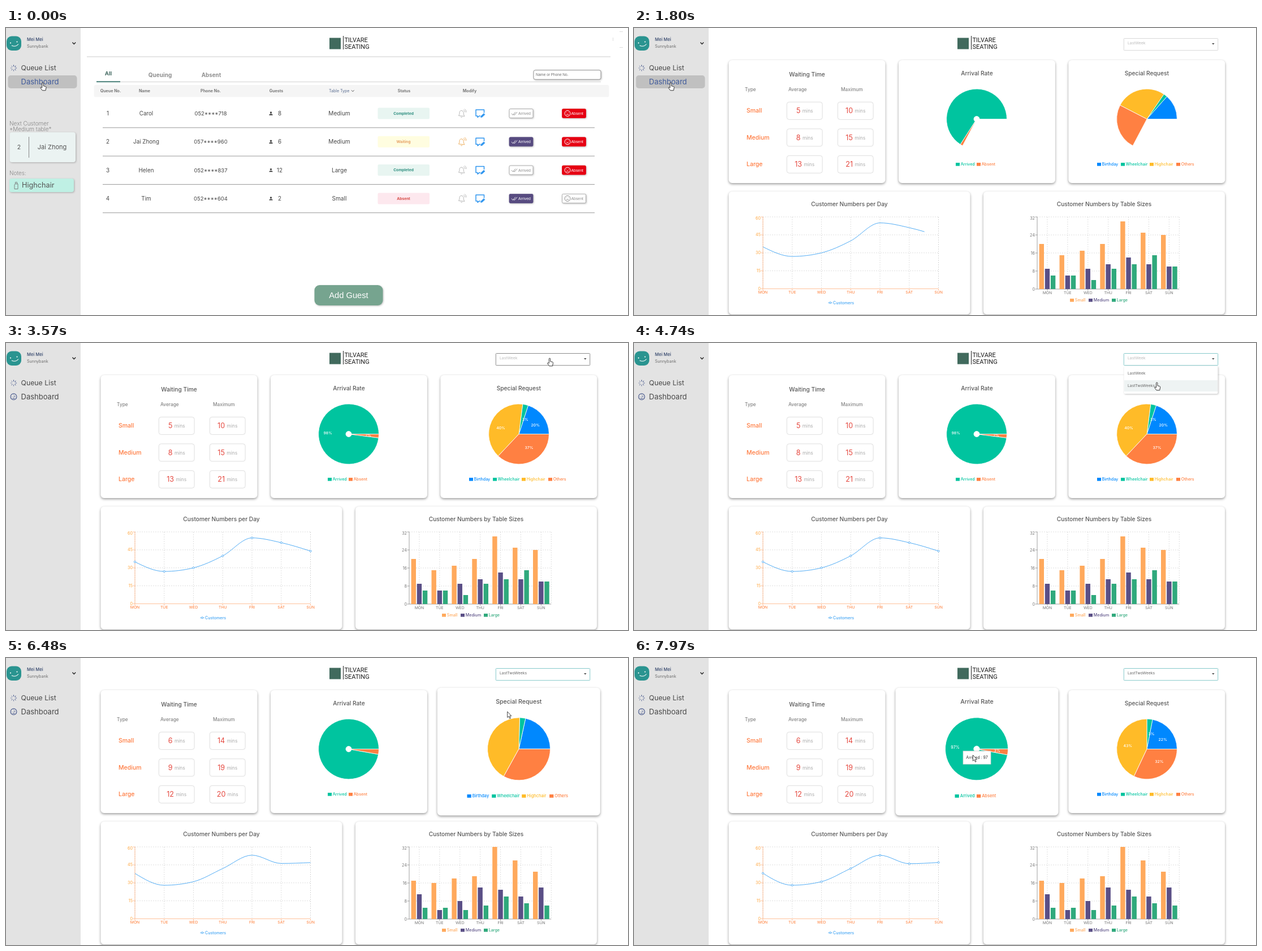
These frames come from a looping animation (1100 px wide and 509 px high, 8000 ms). An HTML page:

```html
<!DOCTYPE html>
<html lang="en">
<head>
<meta charset="utf-8">
<title>Queue dashboard</title>
<style>
  html, body { margin: 0; width: 100%; height: 100%; overflow: hidden; background: #fff; }
  svg { display: block; width: 100vw; height: 100vh; font-family: Inter, "Open Sans", sans-serif; }
  .card { fill: #fff; filter: drop-shadow(0 2.5px 2.2px rgba(0,0,0,.36)) drop-shadow(0 0 1px rgba(0,0,0,.06)); }
  .soft { filter: drop-shadow(1px 1.5px 1.5px rgba(0,0,0,.25)); }
  .mid { text-anchor: middle; }
  .end { text-anchor: end; }
  .m { font-weight: 500; }
  .b { font-weight: 700; }
  .arial { font-family: "Liberation Sans", Arial, sans-serif; }
  .grid { stroke: #d2d2d2; stroke-width: .7; stroke-dasharray: 2 2; fill: none; }
</style>
</head>
<body>
<svg id="stage" viewBox="0 0 1100 509" preserveAspectRatio="none"></svg>
<script>
const LOOP = 8000, MOUNT = 811, SWITCH = 5340;
const DAYS = ['MON', 'TUE', 'WED', 'THU', 'FRI', 'SAT', 'SUN'];
const TEAL = '#00c49f', ORANGE = '#ff8042', YELLOW = '#ffbb28', BLUE = '#0088fe';

const weeks = [
  { wait: [[5, 10], [8, 15], [13, 21]],
    line: [35, 27, 30, 40, 55, 51, 44],
    bars: [[20, 15, 17, 20, 30, 25, 24], [9, 6, 9, 11, 14, 11, 10], [6, 6, 4, 9, 11, 15, 10]],
    arrival: [98, 2], special: [20, 3, 40, 37] },
  { wait: [[6, 14], [9, 19], [12, 20]],
    line: [38, 28, 31, 42, 53, 46, 47],
    bars: [[17, 16, 18, 19, 32, 26, 21], [11, 4, 8, 14, 13, 10, 14], [5, 5, 4, 6, 10, 7, 6]],
    arrival: [97, 3], special: [22, 3, 43, 32] }
];

// Pointer stops: time, x, y
const pointer = [
  [0, 65, 97], [2620, 65, 97], [2730, 84, 113], [2870, 150, 135], [3010, 400, 150],
  [3140, 600, 110], [3250, 730, 55], [3400, 900, 32], [3540, 961.5, 27], [4200, 961.5, 27],
  [4700, 925, 70], [5090, 922, 70], [5400, 911, 66], [6200, 907, 76], [6850, 860, 120],
  [7090, 672, 151], [7300, 655, 160], [7700, 602, 172], [8000, 599, 172]
];

/* ---------- helpers ---------- */
const clamp = v => Math.max(0, Math.min(1, v));
const lerp = (a, b, p) => a + (b - a) * p;
const mix = (a, b, p) => a.map((v, i) => lerp(v, b[i], p));
const r2 = v => Math.round(v * 100) / 100;

function bezier(x1, y1, x2, y2) {
  const at = (a, b, u) => 3 * a * u * (1 - u) ** 2 + 3 * b * u * u * (1 - u) + u ** 3;
  return p => {
    p = clamp(p);
    let lo = 0, hi = 1;
    for (let i = 0; i < 22; i++) {
      const u = (lo + hi) / 2;
      if (at(x1, x2, u) < p) lo = u; else hi = u;
    }
    return p === 0 || p === 1 ? p : at(y1, y2, lo);
  };
}
const ease = bezier(.25, .1, .25, 1), easeOut = bezier(0, 0, .58, 1);
const run = (t, start, length) => ease((t - start) / length);

const text = (x, y, s, size, fill, cls = '', more = '') =>
  `<text x="${r2(x)}" y="${r2(y)}" font-size="${size}" fill="${fill}" class="${cls}" ${more}>${s}</text>`;
const rect = (x, y, w, h, fill, rx = 0, more = '') =>
  `<rect x="${r2(x)}" y="${r2(y)}" width="${r2(w)}" height="${r2(h)}" rx="${rx}" fill="${fill}" ${more}/>`;
const path = (d, stroke, w = 1, fill = 'none', more = '') =>
  `<path d="${d}" stroke="${stroke}" stroke-width="${w}" fill="${fill}" stroke-linejoin="round" ${more}/>`;
const group = (id, body, more = '') => `<g id="${id}" ${more}>${body}</g>`;
const at = (x, y, body) => `<g transform="translate(${x} ${y})">${body}</g>`;

/* ---------- sidebar and header ---------- */
function sidebar() {
  const rays = [...Array(8).keys()].map(i =>
    `<path d="M0-2.8V-5.6" transform="rotate(${i * 45})" stroke="#44558a" stroke-width="1.1" opacity="${1 - i * .07}"/>`).join('');
  return rect(0, 0, 132, 509, '#e3e3e3') +
    rect(1, 14.5, 26, 25.5, '#2a9490', 9) +
    '<circle cx="8" cy="26.5" r="1.1" fill="#fff"/><circle cx="19.5" cy="24.5" r="1.1" fill="#fff"/>' +
    path('M10 31Q17 34.5 22 28.5', '#fff', 1.1) +
    text(37, 23, 'Mei Mei', 7.6, '#33456b', 'm') +
    text(37, 35.3, 'Sunnybank', 7.1, '#6c6c6c') +
    path('M117.5 25.5L120.3 28.6L123.1 25.5', '#222', 1.4) +
    at(13.5, 71, rays) +
    text(26.5, 75.3, 'Queue List', 12.3, '#484848') +
    group('active', rect(3.5, 84, 122, 23, '#c0c0c0', 5)) +
    group('gauge', at(13.5, 95.3, '<circle r="5.4" fill="none" stroke="#44558a" stroke-width="1.1"/>' +
      path('M0 1L2.2-2M-3.3 0H-2.6M3.3 0H2.6M0-3.4V-2.8M-2 3H2', '#44558a', 1))) +
    text(26.5, 99.6, 'Dashboard', 13, '#484848', '', 'id="dash"');
}

const logo = rect(572, 17.5, 20, 20, '#416a5d') + path('M596.5 14V38', '#222', 1) +
  ['TILVARE', 'SEATING'].map((s, i) =>
    text(598.5, 25.4 + i * 11.2, s, 11, '#1c1c1c', '', 'font-family="Roboto, sans-serif"')).join('');

/* ---------- queue page ---------- */
function tableRow([no, name, phone, guests, size, status], i) {
  const y = 151.5 + i * 50.3;
  const [bg, fg] = { Completed: ['#e8f5f1', '#2f8f80'], Waiting: ['#fffde0', '#e6a063'], Absent: ['#fde8ee', '#d64a45'] }[status];
  const bell = status === 'Waiting' ? '#eeb164' : '#b9b9b9';
  const cell = (x, s, size = 9.8) => text(x, y + 3.5, s, size, '#484848', 'mid');
  const button = (x, label, on, color, icon) => {
    const ink = on ? '#fff' : '#8d8d8d';
    return rect(x, y - 8, 42, 16, on ? color : '#fff', 2, `class="soft" stroke="${on ? color : '#999'}" stroke-width=".8"`) +
      at(x, y, icon(ink)) + text(x + 16, y + 2.4, label, 6.9, ink, 'arial');
  };
  const checks = c => path('M4 0L6.5 3L11-2.5M7.5 1.2L9.2 3L14-2.5', c, .9);
  const sad = c => `<circle cx="9.5" r="5" fill="none" stroke="${c}" stroke-width="1"/>` +
    path('M7 2.6Q9.5-.2 12 2.6M7.4-2V-1M11.6-2V-1', c, .9);
  return cell(180, no) + cell(248, name) + cell(362, phone, 9.5) +
    at(468.5, y, '<circle cy="-1.5" r="1.7" fill="#444"/><path d="M-3.2 3.2Q-3 .8 0 .8T3.2 3.2z" fill="#444"/>') +
    cell(484, guests) + cell(589.5, size, 10.1) +
    rect(657.5, y - 10, 91.5, 20, bg, 2) + text(703, y + 2.3, status, 6.7, fg, 'mid b') +
    at(806, y, path('M-5.5 4Q-3.5 1-4-1.5Q-3.5-5.5 0-5Q3.5-4.5 3.2-.5Q3.2 3 5 5zM-2 6Q-.5 8 1.2 6M3-6.5Q5.5-5 5.8-2M5-8Q8-6 8.2-2', bell, 1)) +
    at(838, y, path('M1 4.5H-1L-4 7V4.5H-7V-6.5H7.5V-1', '#3096ef', 1.5) +
      path('M1.5 7L2 4.5L7 0L9 2L4 6.7z', '#3096ef', .6, '#3096ef')) +
    button(890, 'Arrived', status === 'Waiting' || status === 'Absent', '#574b80', checks) +
    button(983.5, 'Absent', status !== 'Absent', '#e60012', sad) +
    path(`M171 ${r2(y + 25.3)}H1041`, '#999', 1);
}

function queuePage() {
  const heads = [[185, 'Queue No.'], [245, 'Name'], [362, 'Phone No.'], [478, 'Guests'], [704, 'Status'], [820, 'Modify']];
  const rows = [
    [1, 'Carol', '052****718', 8, 'Medium', 'Completed'],
    [2, 'Jai Zhong', '057****960', 6, 'Medium', 'Waiting'],
    [3, 'Helen', '052****837', 12, 'Large', 'Completed'],
    [4, 'Tim', '052****604', 2, 'Small', 'Absent']];
  return text(6, 173, 'Next Customer', 10, '#858585', '', 'font-weight="300"') +
    text(6, 183, '*Medium table*', 10, '#858585', '', 'font-weight="300"') +
    rect(6.5, 185, 116.5, 53, '#ebf3f2', 4, 'class="soft"') +
    text(23, 215.3, 2, 10.5, '#555', 'mid') + path('M40.5 193V230', '#888', 1) +
    text(81.5, 215.3, 'Jai Zhong', 11, '#555', 'mid') +
    text(6, 260.5, 'Notes:', 9.8, '#858585', '', 'font-weight="300"') +
    rect(6, 267, 114, 24, '#bff0e4', 4, 'class="soft"') +
    path('M16 276.5H21V285.5H15V278zM16.5 276V273.5H19.5V276', '#777', .9) +
    text(28, 283.3, 'Highchair', 12.7, '#555') +
    path('M143 51H1069', '#e5e5e5', 2) +
    path('M1073.5 17V23M1085 6.5H1091M1085 34.5H1091', '#ddd', 1) +
    path('M202 95.5H1052', '#e5e5e5', 2) + path('M160 95.2H202', '#477f78', 2) +
    text(181, 84.3, 'All', 9.6, '#456b63', 'mid b') +
    text(272.5, 86.8, 'Queuing', 10, '#8f8f8f', 'mid b') + text(363, 86.8, 'Absent', 9.8, '#8f8f8f', 'mid b') +
    rect(933, 74.8, 119, 16.4, '#fff', 3, 'stroke="#888" stroke-width=".9" class="soft"') +
    text(937, 85.3, 'Name or Phone No.', 6.5, '#6f6f6f', 'arial') +
    rect(155.5, 101, 911, 21.5, '#f5f5f5', 3) +
    heads.map(([x, s]) => text(x, 114, s, 7.1, '#777', 'mid b')).join('') +
    text(571, 114, 'Table Type', 7, '#596c90') + path('M611 110.3L613.3 112.8L615.6 110.3', '#555', 1) +
    rows.map(tableRow).join('') +
    rect(545.5, 456, 121, 36, '#76a48f', 9, 'class="soft"') +
    text(606, 479, 'Add Guest', 14.7, '#fff', 'mid arial');
}

/* ---------- dashboard ---------- */
const panel = (x, y, w, title, ty) => rect(x, y, w, 218, '#fff', 6, 'class="card"') +
  text(x + w / 2, ty, title, 10.2, '#575757', 'mid m');
const legend = (y, items) => items.map(([x, s, c]) => rect(x, y - 5, 7, 5.6, c) +
  text(x + 8.8, y + .3, s, 7.1, c, 'm')).join('');

function waitingCard() {
  const heads = [[196, 'Type'], [273, 'Average'], [366, 'Maximum']];
  return panel(167.5, 57, 277, 'Waiting Time', 85.8) +
    heads.map(([x, s]) => text(x, 112, s, 8.3, '#858585', 'm')).join('') +
    ['Small', 'Medium', 'Large'].map((s, i) => {
      const y = 131.3 + i * 47.5;
      return text(199, y + 18.7, s, 10.5, '#ff7a3f', 'm') + [270.3, 360.3].map((x, k) =>
        rect(x, y, 62.8, 31, '#fff', 4, 'stroke="#dedede" stroke-width="1"') +
        `<text x="${x + 31.4}" y="${y + 19.8}" class="mid" font-size="12.6" fill="#e5483f">` +
        `<tspan id="wait${i}${k}"></tspan><tspan dx="3.4" dy="-.8" font-size="8.4" fill="#aaa">mins</tspan></text>`).join('');
    }).join('');
}

const arrivalCard = () => panel(468, 57, 277, 'Arrival Rate', 84) + group('arrivalPie', '') +
  legend(244, [[569, 'Arrived', TEAL], [606, 'Absent', ORANGE]]);
const specialCard = () => panel(768.3, 57, 277, 'Special Request', 84) + group('specialPie', '') +
  legend(244, [[819, 'Birthday', BLUE], [861, 'Wheelchair', TEAL], [912, 'Highchair', YELLOW], [959, 'Others', ORANGE]]);

const LX = 228, LSTEP = 51.75, BX = 713, BAND = 35.9;
const lineY = v => 462.5 - v * 2.125, barY = v => 463 - v * 4;

function axes(x, w, bottom, top, step, xs, yInk, xInk, axis, ty) {
  const rows = [0, 1, 2, 3, 4].map(i => bottom - i * (bottom - top) / 4);
  return path(rows.slice(1).map(y => `M${x} ${y}h${w}`).join('') +
      [...xs, x + w].map(v => `M${r2(v)} ${top}V${bottom}`).join(''), '#d2d2d2', .7, 'none', 'class="grid"') +
    path(`M${x} ${top}V${bottom}H${x + w}` + rows.map(y => `M${x - 3.5} ${y}h3.5`).join('') +
      xs.map(v => `M${r2(v)} ${bottom}v3`).join(''), axis, .8) +
    rows.map((y, i) => text(x - 4, y + (i === 4 ? 5 : 2.6), i * step, 7.2, yInk, 'end')).join('') +
    xs.map((v, i) => text(v, ty, DAYS[i], 6.8, xInk, 'mid')).join('');
}

const lineCard = () => panel(167.5, 290, 427, 'Customer Numbers per Day', 316.3) +
  axes(LX, LSTEP * 6, 462.5, 335, 15, DAYS.map((_, i) => LX + i * LSTEP), '#ffa63f', '#ff7b33', '#ffb182', 471.2) +
  group('line', '') + path('M343.5 487.3H350.5', '#3fa3f3', .9) +
  '<circle cx="347" cy="487.3" r="1.5" fill="#fff" stroke="#3fa3f3" stroke-width=".9"/>' +
  text(352, 489.7, 'Customers', 7.1, '#3fa3f3', 'm');

const BAR_INK = ['#ffa95c', '#5a4f86', '#2fa97c'];
const barCard = () => panel(618, 290, 427, 'Customer Numbers by Table Sizes', 316.3) +
  axes(BX, BAND * 7, 463, 335, 8, DAYS.map((_, i) => BX + (i + .5) * BAND), '#777', '#777', '#888', 472) +
  group('bars', '') +
  legend(485, [[771, 'Small', BAR_INK[0]], [804, 'Medium', BAR_INK[1]], [845, 'Large', BAR_INK[2]]]);

function pie(cx, cy, inner, values, inks, sweep, labels) {
  const R = 53.4, point = (r, a) => [r2(cx + r * Math.cos(a)), r2(cy - r * Math.sin(a))];
  let a = 0, shapes = '', notes = '';
  values.forEach((v, i) => {
    const b = a + v / 100 * sweep * 2 * Math.PI, big = +(b - a > Math.PI);
    if (b > a) shapes += path(`M${point(inner, a)}L${point(R, a)}A${R} ${R} 0 ${big} 0 ${point(R, b)}` +
      `L${point(inner, b)}A${inner} ${inner} 0 ${big} 1 ${point(inner, a)}z`, '#fff', .8, inks[i]);
    const [x, y] = point((R + inner) / 2, (a + b) / 2);
    if (labels) notes += text(x, y + 2.4, Math.round(v) + '%', 6.8, '#fff', x > cx ? 'm' : 'm end');
    a = b;
  });
  return shapes + notes;
}

// Monotone cubic through evenly spaced points
function curve(ys) {
  const d = ys.slice(1).map((y, i) => y - ys[i]);
  const m = ys.map((_, i) => {
    const p = d[i - 1], q = d[i];
    return (Math.sign(p) + Math.sign(q)) * Math.min(Math.abs(p), Math.abs(q), Math.abs(p + q) / 4);
  });
  m[0] = (3 * d[0] - m[1]) / 2;
  m[6] = (3 * d[5] - m[5]) / 2;
  return `M${LX} ${r2(ys[0])}` + d.map((_, i) => {
    const x = LX + i * LSTEP, h = LSTEP / 3;
    return `C${[x + h, ys[i] + m[i] / 3, x + 2 * h, ys[i + 1] - m[i + 1] / 3, x + LSTEP, ys[i + 1]].map(r2)}`;
  }).join('');
}

/* ---------- build ---------- */
const stage = document.getElementById('stage');
const option = (y, s, id) => rect(867, y, 165, 20, '#fff', 0, `id="${id}"`) + text(873, y + 12.4, s, 6.8, '#666');
stage.innerHTML = '<clipPath id="main"><rect x="132" width="948" height="509"/></clipPath>' +
  sidebar() + logo + group('queue', queuePage()) +
  group('clip', group('dashboard', group('waiting', waitingCard()) + group('arrival', arrivalCard()) +
    group('special', specialCard()) + lineCard() + barCard()), 'clip-path="url(#main)"') +
  group('select', rect(866.3, 18.5, 166.4, 21.2, '#fff', 1, 'id="box"') +
    text(873, 29.4, '', 6.8, '#bbb', '', 'id="choice"') + '<path d="M1022 27h4.6l-2.3 2.4z" fill="#444"/>') +
  group('menu', rect(866.5, 41, 166, 49, '#fff', 2, 'class="soft"') + option(44, 'LastWeek', 'opt0') + option(66, 'LastTwoWeeks', 'opt1')) +
  group('tip', rect(582, 165, 49, 23.3, '#fff', 0, 'stroke="#ccc" stroke-width=".8"') +
    text(606.5, 179, 'Arrived : 97', 7, '#333', 'mid')) +
  group('pointer', path('M-1.2 9V1.2a1.2 1.2 0 0 1 2.4 0V5.8l3.4.7q1.6.4 1.4 2L5 13.8H-.6L-3.8 9.6q-.6-1.6 1-1.4z', '#222', .9, '#fff', 'id="hand"') +
    path('M0 0V10.5L2.4 8.4L4.2 12.4L5.8 11.7L4.1 7.8H7.2z', '#333', .9, '#fff', 'id="arrow"'));

const el = {};
stage.querySelectorAll('[id]').forEach(n => el[n.id] = n);
const show = (n, on) => n.setAttribute('display', on ? 'inline' : 'none');
const last = {};
function fill(id, html) {
  if (last[id] !== html) el[id].innerHTML = last[id] = html;
}

// Card centre, then alternating enter and leave times
const hovers = { waiting: [306, 2880, 3020], arrival: [606.5, 3020, 3250, 7090, 9999], special: [906.8, 5100, 6990] };
function lift(id, t) {
  const [cx, ...spans] = hovers[id];
  const level = spans.reduce((sum, at, i) => sum + run(t, at, 300) * (i % 2 ? -1 : 1), 0);
  el[id].setAttribute('transform', `translate(${cx} 166) scale(${1 + .04 * level}) translate(${-cx} -166)`);
}

function movePointer(t) {
  const i = Math.max(0, pointer.findIndex(k => k[0] > t) - 1);
  const [a, b] = [pointer[i], pointer[i + 1]], p = (t - a[0]) / (b[0] - a[0]);
  el.pointer.setAttribute('transform', `translate(${r2(lerp(a[1], b[1], p))} ${r2(lerp(a[2], b[2], p))})`);
  const hand = t < 2680 || (t > 3400 && t < 5100);
  show(el.hand, hand);
  show(el.arrow, !hand);
}

function charts(t) {
  const [a, b] = weeks, now = t < SWITCH ? a : b;
  now.wait.forEach((pair, i) => pair.forEach((v, k) => fill(`wait${i}${k}`, String(v))));

  const ys = mix(a.line, b.line, run(t, SWITCH, 1500)).map(lineY);
  const drawn = run(t, MOUNT, 1500);
  const dots = (t >= MOUNT + 1500 && t < SWITCH) || t >= SWITCH + 1500;
  fill('line', path(curve(ys), '#3fa3f3', .9, 'none', drawn < 1 ? `pathLength="1" stroke-dasharray="${drawn} 2"` : '') +
    (dots ? ys.map((y, i) => `<circle cx="${LX + i * LSTEP}" cy="${r2(y)}" r="1.6" fill="#fff" stroke="#3fa3f3" stroke-width=".8"/>`).join('') : ''));

  const grow = run(t, MOUNT, 400), change = run(t, SWITCH, 400);
  fill('bars', BAR_INK.map((ink, k) => mix(a.bars[k], b.bars[k], change).map((v, i) =>
    rect(BX + i * BAND + 3.6 + k * 10.15, barY(v * grow), 8.4, v * grow * 4, ink)).join('')).join(''));

  const sweep = run(t, MOUNT + 400, 1500), turn = run(t, SWITCH + 400, 1500);
  const labels = (sweep === 1 && t < SWITCH) || turn === 1;
  fill('arrivalPie', pie(606, 161.5, 5, mix(a.arrival, b.arrival, turn), [TEAL, ORANGE], sweep, labels));
  fill('specialPie', pie(907, 161.5, 0, mix(a.special, b.special, turn), [BLUE, TEAL, YELLOW, ORANGE], sweep, labels));
}

function draw(t) {
  const over = t < 2680;
  show(el.active, over);
  show(el.gauge, !over);
  el.dash.setAttribute('fill', over ? '#3f5a9b' : '#484848');

  show(el.queue, t < MOUNT);
  el.queue.setAttribute('opacity', 1 - clamp((t - 520) / 240));

  show(el.clip, t >= MOUNT);
  show(el.select, t >= MOUNT);
  const slide = easeOut((t - MOUNT) / 720);
  el.dashboard.setAttribute('transform', `translate(${r2(948 * (1 - slide))} 0)`);
  el.dashboard.setAttribute('opacity', r2(slide));

  const chosen = t >= 5090;
  fill('choice', chosen ? 'LastTwoWeeks' : 'LastWeek');
  el.choice.setAttribute('fill', chosen ? '#666' : '#bbb');
  el.box.setAttribute('stroke', t >= 4060 ? '#85c9cb' : t >= 3430 ? '#8c8c8c' : '#d8d8d8');
  show(el.menu, t >= 4180 && !chosen);
  el.opt0.setAttribute('fill', t < 4640 ? '#eef3f3' : '#fff');
  el.opt1.setAttribute('fill', t < 4640 ? '#fff' : '#eef3f3');

  Object.keys(hovers).forEach(id => lift(id, t));
  charts(t);
  show(el.tip, t >= 7480);
  movePointer(t);
}

const begin = performance.now();
function frame() {
  draw((performance.now() - begin) % LOOP);
  requestAnimationFrame(frame);
}
frame();
</script>
</body>
</html>
```
